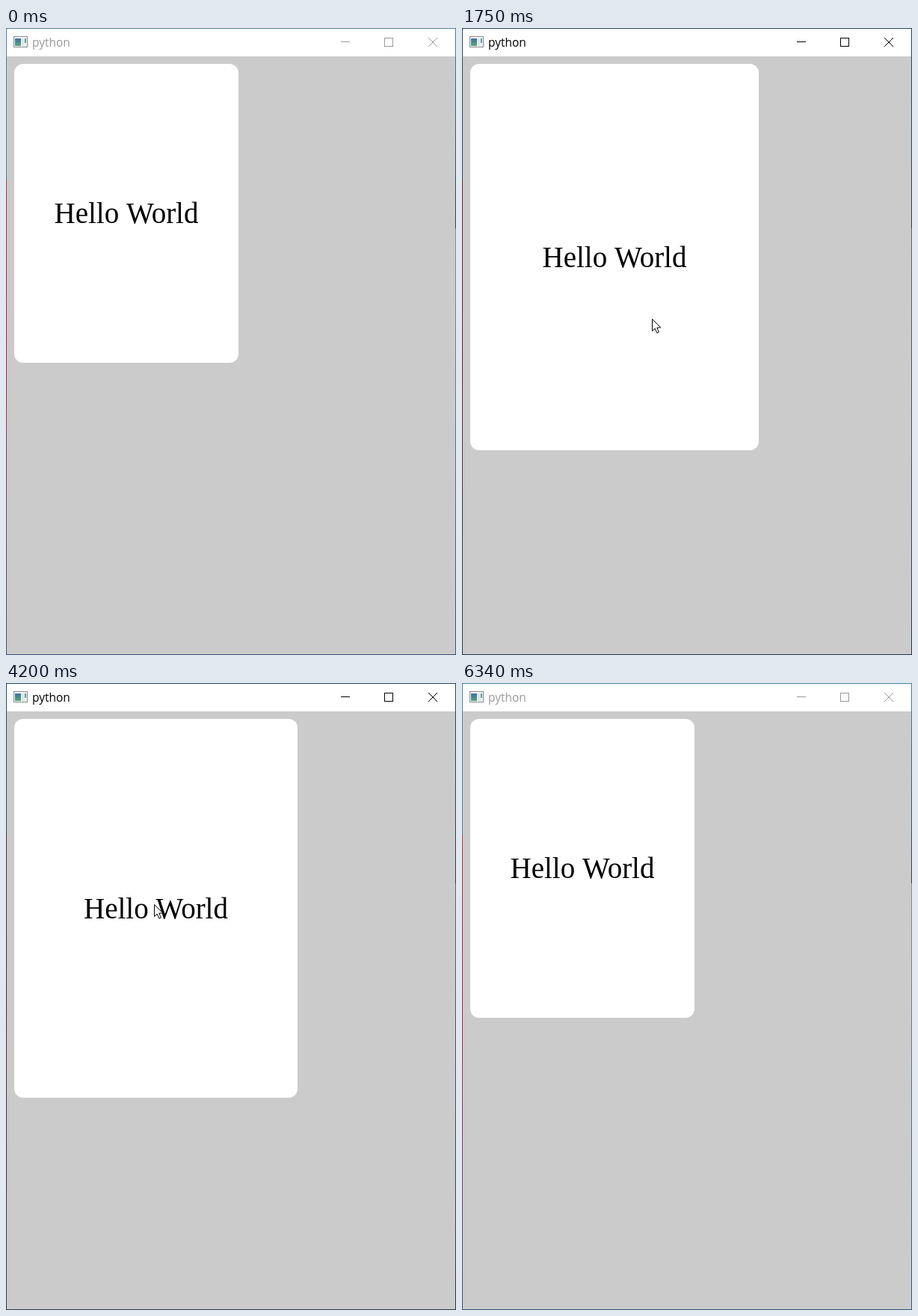
Recreate the animation shown at these times as an HTML page with a canvas. Size 602x839 px, loop 6.44 s.

```html
<!DOCTYPE html>
<html>
<head>
<meta charset="utf-8">
<style>
  html, body { margin: 0; width: 100%; height: 100%; overflow: hidden; background: #cbcbcb; }
  canvas { display: block; }
</style>
</head>
<body>
<canvas id="stage" width="602" height="839"></canvas>
<script>
const W = 602, H = 839, LOOP = 6440;
const ctx = document.getElementById('stage').getContext('2d');

// The card grows while the button is held and shrinks after release.
const GROW = 930, SHRINK = 400;
const toggles = [461, 1475, 1759, 2131, 2379, 3392, 3938, 4767];
const ACTIVATE = toggles[0], DEACTIVATE = 6340;

// Resting points of the pointer: [ms, x, y]
const pointer = [
  [100, 300, 845], [700, 164, 297], [870, 164, 297], [1750, 254, 389], [2540, 174, 279],
  [3530, 228, 300], [4790, 173, 293], [5300, 173, 293], [5750, 265, 845]
];

function cardGrowth(t) {
  let size = 0;
  toggles.forEach((from, i) => {
    const elapsed = Math.max(0, Math.min(t, toggles[i + 1] ?? LOOP) - from);
    const change = i % 2 ? -elapsed / SHRINK : elapsed / GROW;
    size = Math.max(0, Math.min(1, size + change));
  });
  return size;
}

function pointerAt(t) {
  const i = pointer.findIndex(key => key[0] > t);
  if (i < 1) return null;
  const [t0, x0, y0] = pointer[i - 1], [t1, x1, y1] = pointer[i];
  const p = (t - t0) / (t1 - t0), eased = p * p * (3 - 2 * p);
  return [x0 + (x1 - x0) * eased, y0 + (y1 - y0) * eased];
}

function rect(x, y, w, h, fill) {
  ctx.fillStyle = fill;
  ctx.fillRect(x, y, w, h);
}

function verticalFade(top, bottom, ...colors) {
  const fade = ctx.createLinearGradient(0, top, 0, bottom);
  colors.forEach((color, i) => fade.addColorStop(i / (colors.length - 1), color));
  return fade;
}

// The desktop shows through the thin window frame.
function drawBorder(active) {
  const top = active ? '#24485a' : '#4b8098';
  const bottom = active ? '#25344c' : '#34517a';
  const reds = active ? ['#701f22', '#6a1428', '#3c2a48'] : ['#b83c3c', '#b81c40', '#7a4078'];
  rect(0, 0, 1, 203, top);
  rect(0, 203, 1, H - 203, verticalFade(203, H, ...reds, bottom));
  rect(W - 1, 0, 1, 268, verticalFade(0, 268, top, '#303c46'));
  rect(W - 1, 268, 1, H - 268, verticalFade(268, H, active ? '#606468' : '#8c8c8c', bottom));
  rect(0, 0, W, 1, top);
  rect(0, H - 1, W, 1, bottom);
}

function drawIcon() {
  rect(10, 11, 19, 15, '#858c90');
  rect(11, 12, 17, 13, '#f4f6f7');
  rect(12, 14, 8, 10, verticalFade(14, 24, '#3f6fa0', '#52a878'));
  rect(21, 14, 4, 10, '#dfe5e7');
  rect(25, 14, 2, 6, '#6c9da4');
}

function drawTitleBar(active) {
  const ink = active ? '#000' : '#999';
  rect(1, 1, W - 2, 37, '#fff');
  drawIcon();
  ctx.font = '15.5px "Open Sans", "Noto Sans", sans-serif';
  ctx.textAlign = 'left';
  ctx.fillStyle = ink;
  ctx.fillText('python', 35, 25);
  rect(448, 18, 12, 1, ink);
  ctx.strokeStyle = ink;
  ctx.lineWidth = 1;
  ctx.strokeRect(506.5, 13.5, 11, 11);
  ctx.stroke(new Path2D('M565 13l12 12M577 13l-12 12'));
}

function drawCard(size) {
  const w = Math.floor(300 + 280 * size), h = Math.floor(400 + 380 * size);
  ctx.fillStyle = '#fff';
  ctx.beginPath();
  ctx.roundRect(11, 48, w, h, 12);
  ctx.fill();
  ctx.font = '39px "Liberation Serif", "Noto Serif", serif';
  ctx.textAlign = 'center';
  ctx.fillStyle = '#000';
  ctx.fillText('Hello World', 11 + w / 2, 48 + Math.round(h / 2) + 13);
}

const arrow = new Path2D('M0 0V16L3.7 12.6L6.4 18.6L8.9 17.5L6.3 11.6L11.3 11.4Z');

function drawPointer([x, y]) {
  ctx.save();
  ctx.translate(Math.round(x) + .5, Math.round(y) + .5);
  ctx.fillStyle = '#fff';
  ctx.fill(arrow);
  ctx.strokeStyle = '#000';
  ctx.lineWidth = 1;
  ctx.stroke(arrow);
  ctx.restore();
}

function draw(t) {
  const active = t >= ACTIVATE && t < DEACTIVATE;
  const position = pointerAt(t);
  rect(0, 0, W, H, '#cbcbcb');
  drawTitleBar(active);
  drawCard(cardGrowth(t));
  if (position) drawPointer(position);
  drawBorder(active);
}

const start = performance.now();
function tick() {
  draw((performance.now() - start) % LOOP);
  requestAnimationFrame(tick);
}
tick();
</script>
</body>
</html>
```
